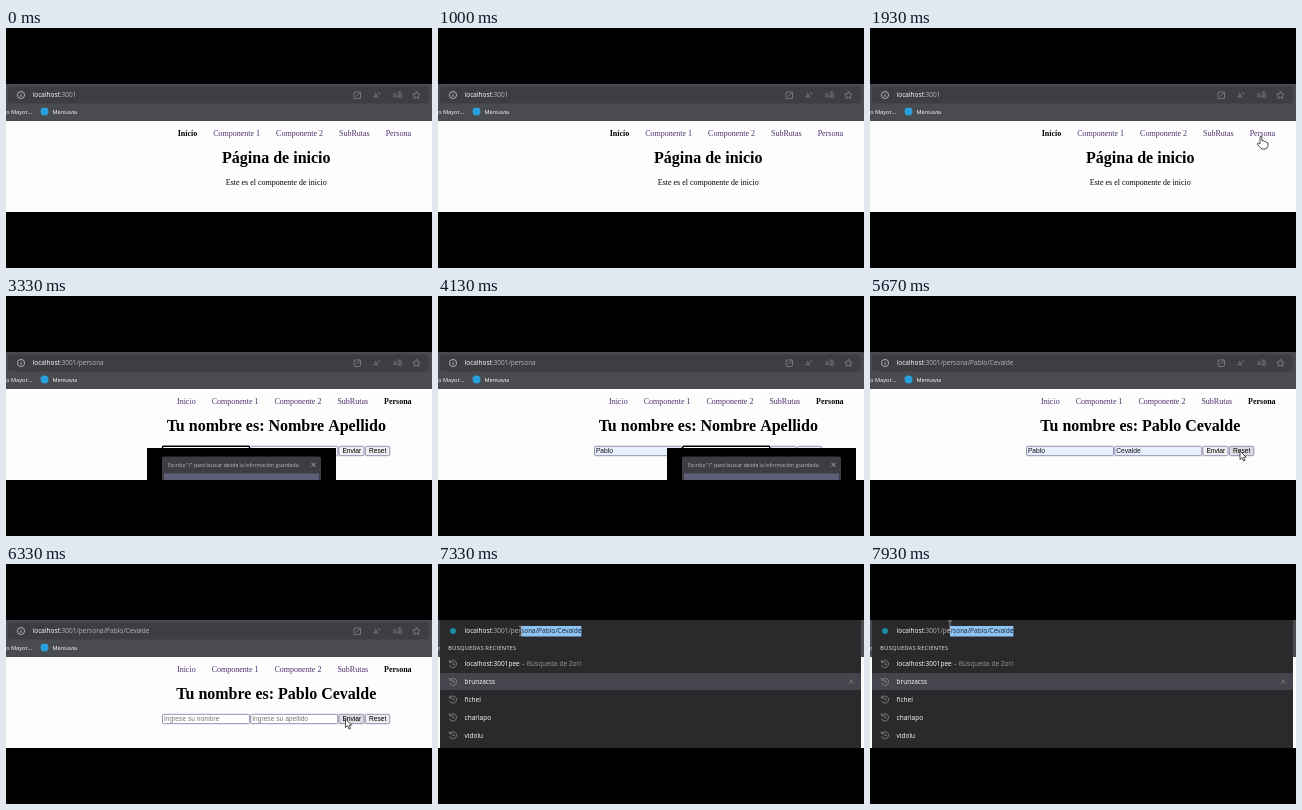
An HTML page with a canvas that plays this animation: 426 px wide and 240 px high, repeating every 8000 ms.

```html
<!DOCTYPE html>
<html lang="es">
<head>
<meta charset="utf-8">
<title>Rutas con parámetros</title>
<style>
html, body { margin: 0; height: 100%; overflow: hidden; background: #000; }
canvas { display: block; width: 426px; height: 240px; }
</style>
</head>
<body>
<canvas></canvas>
<script>
const canvas = document.querySelector('canvas');
const ctx = canvas.getContext('2d');
const scale = window.devicePixelRatio || 1;
canvas.width = 426 * scale;
canvas.height = 240 * scale;

const LOOP = 8000;
const UI = '"Open Sans", sans-serif';
const SERIF = '"Liberation Serif", serif';
const ARIAL = '"Liberation Sans", sans-serif';
const FIRST = 'Pablo', LAST = 'Cevalde';
const NAV = ['Inicio', 'Componente 1', 'Componente 2', 'SubRutas', 'Persona'];
const RECENT = ['localhost:3001pee', 'brunzacss', 'fichel', 'charlapo', 'vidolu'];

// Moments (ms) at which the interface changes state
const AT = { persona: 2250, focus1: 2850, fill1: 3650, focus2: 3850, fill2: 4300,
             submit: 4700, reset: 5750, search: 6950 };

// Pointer path: time, x, y
const PATH = [
  [900, 330, 192], [1500, 391, 108], [2300, 391, 108], [2750, 205, 155], [2900, 205, 190],
  [4350, 300, 190], [4600, 345, 155], [4750, 345, 155], [4950, 350, 192],
  [5250, 360, 192], [5600, 370, 155], [5800, 370, 155], [6150, 339.5, 155], [6450, 339.5, 155],
  [6850, 144, 66], [6950, 144, 66], [7250, 83.5, 66], [7400, 83, 65], [7800, 80, 60]
];

function pointer(t) {
  if (t < PATH[0][0]) return null;
  const next = PATH.findIndex(p => p[0] > t);
  if (next < 0) return PATH.at(-1).slice(1);
  const [t0, x0, y0] = PATH[next - 1], [t1, x1, y1] = PATH[next];
  const u = (t - t0) / (t1 - t0), e = u * u * (3 - 2 * u);
  return [x0 + (x1 - x0) * e, y0 + (y1 - y0) * e];
}

function rect(x, y, w, h, fill, stroke, radius = 0, line = 1) {
  ctx.beginPath();
  ctx.roundRect(x, y, w, h, radius);
  if (fill) { ctx.fillStyle = fill; ctx.fill(); }
  if (stroke) { ctx.strokeStyle = stroke; ctx.lineWidth = line; ctx.stroke(); }
}

function circle(x, y, r, fill, stroke) {
  rect(x - r, y - r, 2 * r, 2 * r, fill, stroke, r, 0.8);
}

function polyline(points, color, width = 0.8) {
  ctx.beginPath();
  points.forEach(([x, y]) => ctx.lineTo(x, y));
  ctx.strokeStyle = color;
  ctx.lineWidth = width;
  ctx.stroke();
}

// Draws text and returns the x where it ends
function text(str, x, y, size, color, family = UI, weight = 400) {
  ctx.font = `${weight} ${size}px ${family}`;
  ctx.fillStyle = color;
  ctx.fillText(str, x, y);
  return x + ctx.measureText(str).width;
}

function centered(str, x, y, size, weight) {
  ctx.textAlign = 'center';
  text(str, x, y, size, '#000', SERIF, weight);
  ctx.textAlign = 'left';
}

function cross(x, y, color) {
  polyline([[x - 2, y - 2], [x + 2, y + 2]], color);
  polyline([[x + 2, y - 2], [x - 2, y + 2]], color);
}

function address(path) {
  const x = text('localhost', 26.6, 69.3, 6.5, '#fff');
  return text(':3001' + path, x, 69.3, 6.5, '#b6b8bb');
}

function toolbar(path) {
  const icon = '#85878c';
  rect(0, 56, 426, 37, '#4a4b51');
  rect(2, 58.5, 421, 17, '#3d3e42', null, 4);
  circle(15, 67, 3.6, null, '#c4c5c8');
  polyline([[15, 66.4], [15, 69]], '#c4c5c8');
  polyline([[15, 64.8], [15, 65.6]], '#c4c5c8');
  address(path);

  rect(348, 64, 6.5, 6.5, null, icon, 1, 0.8);
  polyline([[350, 68.5], [354.5, 64]], icon);
  text('A', 367.5, 70, 7, icon);
  text('»', 372, 67, 5, icon);
  text('aあ', 387, 69.2, 6.3, icon, '"Noto Sans CJK JP", "Noto Sans CJK", sans-serif');
  const star = Array.from({ length: 11 }, (_, i) => {
    const a = i * Math.PI / 5 - Math.PI / 2, r = i % 2 ? 1.9 : 4;
    return [410.5 + r * Math.cos(a), 67.3 + r * Math.sin(a)];
  });
  polyline(star, icon);

  text('o Mayor...', 0, 85.8, 5.7, '#fff');
  circle(38.5, 83.5, 4, '#2aa1dc');
  text('Mensavia', 46.5, 85.8, 5.6, '#fff');
}

function navigation(active) {
  const fontOf = label => `${label === active ? 700 : 400} 8px ${SERIF}`;
  const widths = NAV.map(label => { ctx.font = fontOf(label); return ctx.measureText(label).width; });
  let x = 288.3 - (widths.reduce((a, b) => a + b) + 16 * (NAV.length - 1)) / 2;
  NAV.forEach((label, i) => {
    const on = label === active;
    text(label, x, 107.8, 8, on ? '#000' : '#4c2f6c', SERIF, on ? 700 : 400);
    x += widths[i] + 16;
  });
}

function field(x, value, hint, focused) {
  rect(x + 0.5, 150.3, 87, 9.4, value ? '#e8f0fe' : '#fff',
    focused ? '#000' : '#8a86aa', 1, focused ? 1.5 : 0.9);
  text(value || hint, x + 1.9, 157.3, 6.67, value ? '#111' : '#777', ARIAL);
}

function button(label, x, w, hovered) {
  rect(x, 150.3, w, 9.4, hovered ? '#dcdce2' : '#efeff2', '#8a86aa', 1.5, 0.9);
  text(label, x + 3.6, 157.3, 6.67, '#000', ARIAL);
}

function suggestions(x) {
  rect(x - 15, 152, 189, 32, '#000');
  rect(x, 160.5, 159, 30, '#3d3d43', null, 2);
  text('Escriba "/" para buscar desde la información guardada', x + 6, 171, 5.17, '#bcbcc0');
  cross(x + 151.5, 168.8, '#bcbcc0');
  rect(x + 2, 177.5, 155, 12, '#5c5e78', null, 1);
}

function form(t, mouse) {
  const filled = t < AT.reset;
  const over = (x, w) => mouse && Math.abs(mouse[1] - 155) < 5 && mouse[0] > x && mouse[0] < x + w;
  const first = t >= AT.focus1 && t < AT.fill1, second = t >= AT.focus2 && t < AT.fill2;
  field(156, filled && t >= AT.fill1 ? FIRST : '', 'Ingrese su nombre', first);
  field(244.3, filled && t >= AT.fill2 ? LAST : '', 'Ingrese su apellido', second);
  button('Enviar', 332.8, 25.3, over(332, 26));
  button('Reset', 359.3, 24.5, over(359, 25));
  if (first) suggestions(156);
  if (second) suggestions(244);
}

function historyIcon(y) {
  const gray = '#8d8c86';
  ctx.beginPath();
  ctx.arc(15, y, 3.6, -2.6, 2.9);
  ctx.strokeStyle = gray;
  ctx.lineWidth = 0.8;
  ctx.stroke();
  polyline([[11.4, y - 4], [11.4, y - 1.6], [13.8, y - 1.6]], gray);
  polyline([[15, y - 2], [15, y + 0.4], [16.8, y + 0.4]], gray);
}

function searchPanel(path, mouse) {
  rect(2, 56, 421, 128, '#2a2a2c');
  circle(15, 67, 3, '#198ba3');
  const end = address(path);
  const start = Math.min(mouse[0], end);
  rect(start, 62, end - start, 10.5, '#8ec3f4');
  ctx.save();
  ctx.beginPath();
  ctx.rect(start, 60, end - start, 14);
  ctx.clip();
  text('localhost:3001' + path, 26.6, 69.3, 6.5, '#16242f');
  ctx.restore();

  text('BÚSQUEDAS RECIENTES', 10, 85.5, 6, '#b4b5b8', UI, 600);
  rect(2, 109, 421, 17, '#45464d');
  cross(413, 117.5, '#85868a');
  RECENT.forEach((label, i) => {
    const y = 100 + i * 17.8;
    historyIcon(y);
    const x = text(label, 26.6, y + 2.3, 6.5, '#fff');
    if (!i) text('– Búsqueda de Zorl', x + 2, y + 2.3, 6.6, '#97989c');
  });
}

function cursor([x, y], kind) {
  ctx.save();
  ctx.translate(x, y);
  ctx.lineJoin = 'round';
  if (kind === 'beam') {
    polyline([[-2, -3], [2, -3]], '#aaa');
    polyline([[0, -3], [0, 6]], '#aaa');
    polyline([[-2, 6], [2, 6]], '#aaa');
  } else {
    const shape = new Path2D(kind === 'hand'
      ? 'M-1 1Q0-1 1 1V5Q3 4 3.5 5.5Q5 5 5.5 6.5Q7 6 7 8V10Q6 13 4 13H1Q-1 12-4 8Q-3 6-1 8Z'
      : 'M0 0V8.5L2 6.7L3.5 10L5 9.3L3.6 6.2H6.2Z');
    ctx.fillStyle = '#fff';
    ctx.strokeStyle = '#222';
    ctx.lineWidth = 0.8;
    ctx.fill(shape);
    ctx.stroke(shape);
  }
  ctx.restore();
}

function cursorKind(t, [x, y]) {
  if (t >= AT.search) return 'beam';
  if (x > 377 && y > 101 && y < 111) return 'hand';
  const inField = t > AT.persona && x > 156 && x < 332 && y > 150 && y < 160;
  const inAddress = x > 25 && x < 340 && y < 75;
  return inField || inAddress ? 'beam' : 'arrow';
}

function draw(t) {
  const mouse = pointer(t);
  const person = t >= AT.persona, sent = t >= AT.submit;
  const path = sent ? `/persona/${FIRST}/${LAST}` : person ? '/persona' : '';
  ctx.setTransform(scale, 0, 0, scale, 0, 0);
  rect(0, 0, 426, 240, '#000');
  ctx.save();
  ctx.beginPath();
  ctx.rect(0, 56, 426, 128);
  ctx.clip();
  rect(0, 93, 426, 91, '#fdfdfd');
  toolbar(path);
  navigation(person ? 'Persona' : 'Inicio');
  if (person) {
    centered('Tu nombre es: ' + (sent ? `${FIRST} ${LAST}` : 'Nombre Apellido'), 270.3, 135, 16, 700);
    form(t, mouse);
  } else {
    centered('Página de inicio', 270.3, 135, 16, 700);
    centered('Este es el componente de inicio', 270.3, 156.6, 8, 400);
  }
  if (t >= AT.search) searchPanel(path, mouse);
  if (mouse) cursor(mouse, cursorKind(t, mouse));
  ctx.restore();
}

function frame() {
  draw(performance.now() % LOOP);
  requestAnimationFrame(frame);
}
frame();
</script>
</body>
</html>
```
